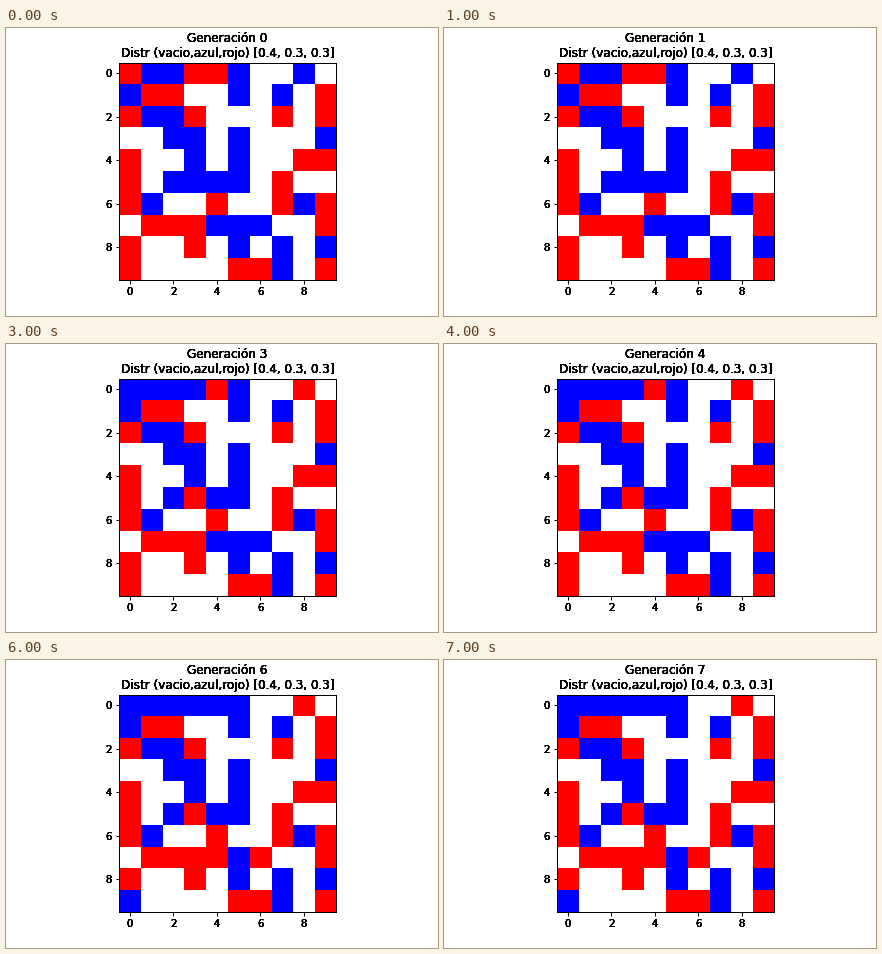
A matplotlib script that plays this animation: 432x288 px, repeating every 8000 ms.

```python
import matplotlib.pyplot as plt
import numpy as np
from matplotlib.animation import FuncAnimation
from matplotlib.colors import ListedColormap

plt.rcParams.update({
    "font.family": "DejaVu Sans",
    "font.size": 10,
    "axes.titlesize": 12,
    "axes.linewidth": 1,
    "xtick.major.width": 1,
    "ytick.major.width": 1,
})

GENERATIONS = 8
START = """
RBBRRB..B.
BRR..B.B.R
RBBR...R.R
..BB.B...B
R..B.B..RR
R.BBBB.R..
RB..R..RBR
.RRRBBB..R
R..R.B.B.B
R....RRB.R
""".split()

# Generation -> pair of (row, column) cells that trade places
SWAPS = {
    2: ((0, 0), (0, 8)),
    3: ((0, 3), (5, 3)),
    5: ((9, 0), (7, 6)),
    6: ((0, 4), (7, 4)),
}


def grid_at(generation):
    grid = np.array([[".BR".index(c) for c in row] for row in START])
    for when, (a, b) in SWAPS.items():
        if when <= generation:
            grid[a], grid[b] = grid[b], grid[a]
    return grid


def harden(text, passes=8):
    """Draw a text several times so its soft edges turn solid."""
    draw = text.draw

    def draw_repeatedly(renderer):
        for _ in range(passes):
            draw(renderer)

    text.draw = draw_repeatedly


fig, ax = plt.subplots(figsize=(6, 4), dpi=72, facecolor="white")
fig.subplots_adjust(left=0.125, right=0.9, bottom=0.125, top=0.88)
image = ax.imshow(grid_at(0), cmap=ListedColormap(["white", "blue", "red"]),
                  vmin=0, vmax=2, interpolation="nearest")
ax.set_xticks(range(0, 10, 2))
ax.set_yticks(range(0, 10, 2))
title = ax.set_title("")
for label in [title, *ax.get_xticklabels(), *ax.get_yticklabels()]:
    harden(label)


def update(generation):
    image.set_data(grid_at(generation))
    title.set_text(f"Generación {generation}\n"
                   "Distr (vacio,azul,rojo) [0.4, 0.3, 0.3]")
    return image, title


anim = FuncAnimation(fig, update, frames=GENERATIONS, interval=1000,
                     repeat=True, repeat_delay=0, blit=False)
plt.show()
```
